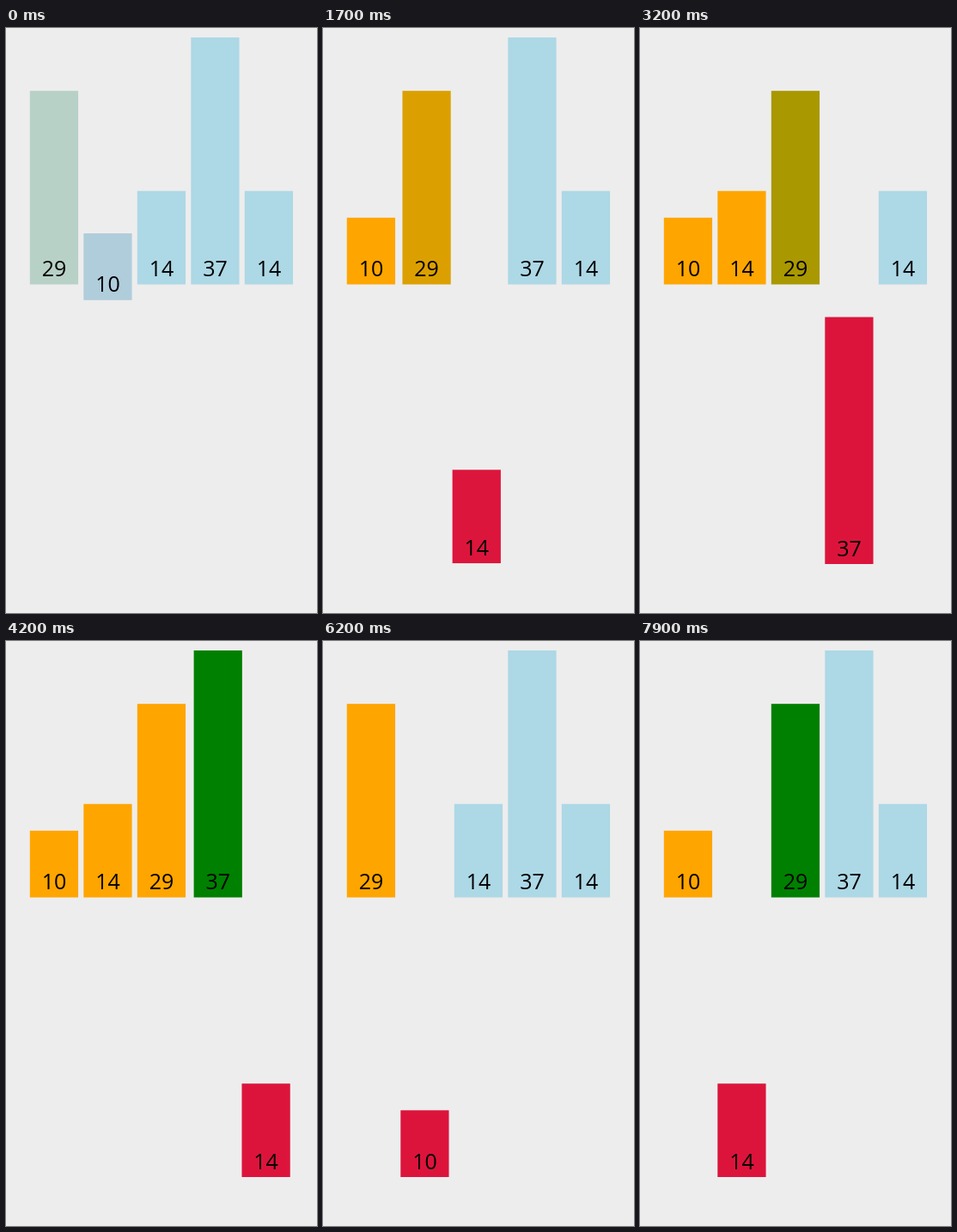
An HTML page for the animation above (8 s loop, 362x681 px).

```html
<!DOCTYPE html>
<html lang="en">
<head>
<meta charset="utf-8">
<title>Insertion sort</title>
<style>
  html, body { margin: 0; width: 100%; height: 100%; overflow: hidden; background: #ededed; }
  svg { display: block; width: 362px; height: 681px; }
  text { font: 25px "Open Sans", "Noto Sans", sans-serif; text-anchor: middle; }
</style>
</head>
<body>
<svg viewBox="0 0 362 681"></svg>
<script>
const LOOP = 8000, CYCLE = 5950, CYCLE_START = -230, DURATION = 230;
const LEFT = 27.8, PITCH = 62.5, WIDTH = 56.25, UNIT = 7.77, BASE = 298.5, DROP = 325.5;
const BLUE = [173, 216, 230], ORANGE = [255, 165, 0], RED = [220, 20, 60], GREEN = [0, 128, 0];
const VALUES = [29, 10, 14, 37, 14];
const SORTED_SLOTS = [3, 0, 1, 4, 2];

// Each step: start time, bar index, changed properties, optional duration.
const steps = [
  ...VALUES.map((_, i) => [CYCLE_START, i, { slot: i, color: BLUE }, 196]),
  // insert 10
  [-55, 0, { color: ORANGE }],
  [-34, 1, { down: 1, color: RED }],
  [580, 0, { color: GREEN }],
  [810, 0, { slot: 1, color: ORANGE }],
  [810, 1, { slot: 0, down: 0, color: ORANGE }],
  // insert the first 14
  [1445, 2, { down: 1, color: RED }, 265],
  [1645, 0, { color: GREEN }],
  [1676, 0, { slot: 2 }, 210],
  [1676, 2, { slot: 1 }, 210],
  [2330, 0, { color: ORANGE }],
  [2330, 1, { color: GREEN }],
  [2330, 2, { down: 0, color: ORANGE }],
  // insert 37
  [2550, 1, { color: ORANGE }],
  [2550, 3, { down: 1, color: RED }],
  [3110, 0, { color: GREEN }],
  [3340, 3, { down: 0, color: ORANGE }],
  // insert the second 14
  [3340, 4, { down: 1, color: RED }],
  [3950, 0, { color: ORANGE }],
  [3950, 3, { color: GREEN }],
  [4167, 3, { slot: 4 }],
  [4167, 4, { slot: 3 }],
  [4260, 3, { color: ORANGE }],
  [4802, 0, { slot: 3 }, 213],
  [4802, 0, { color: GREEN }, 150],
  [4802, 4, { slot: 2 }, 213],
  [5010, 0, { color: ORANGE }],
  [5010, 4, { down: 0, color: ORANGE }]
];

const ease = p => (1 - Math.cos(Math.PI * p)) / 2;
const mix = (a, b, p) => Array.isArray(a) ? a.map((v, i) => mix(v, b[i], p)) : a + (b - a) * p;

function addNode(parent, tag, attributes) {
  const node = document.createElementNS("http://www.w3.org/2000/svg", tag);
  for (const name in attributes) node.setAttribute(name, attributes[name]);
  return parent.appendChild(node);
}

const svg = document.querySelector("svg");
const bars = VALUES.map(value => {
  const group = addNode(svg, "g");
  const rect = addNode(group, "rect", { y: -value * UNIT, width: WIDTH, height: value * UNIT });
  addNode(group, "text", { x: WIDTH / 2, y: -9.5 }).textContent = value;
  return { group, rect };
});

function stateAt(time) {
  const state = SORTED_SLOTS.map(slot => ({ slot, down: 0, color: ORANGE }));
  for (const [start, index, changes, duration = DURATION] of steps) {
    if (time <= start) continue;
    const progress = ease(Math.min(1, (time - start) / duration));
    for (const key in changes) {
      state[index][key] = mix(state[index][key], changes[key], progress);
    }
  }
  return state;
}

function render(now) {
  const time = (now % LOOP - CYCLE_START) % CYCLE + CYCLE_START;
  stateAt(time).forEach(({ slot, down, color }, i) => {
    const { group, rect } = bars[i];
    group.setAttribute("transform", `translate(${LEFT + slot * PITCH} ${BASE + down * DROP})`);
    rect.setAttribute("fill", `rgb(${color.map(Math.round)})`);
  });
}

const origin = performance.now();
function tick() {
  render(performance.now() - origin);
  requestAnimationFrame(tick);
}
tick();
</script>
</body>
</html>
```
